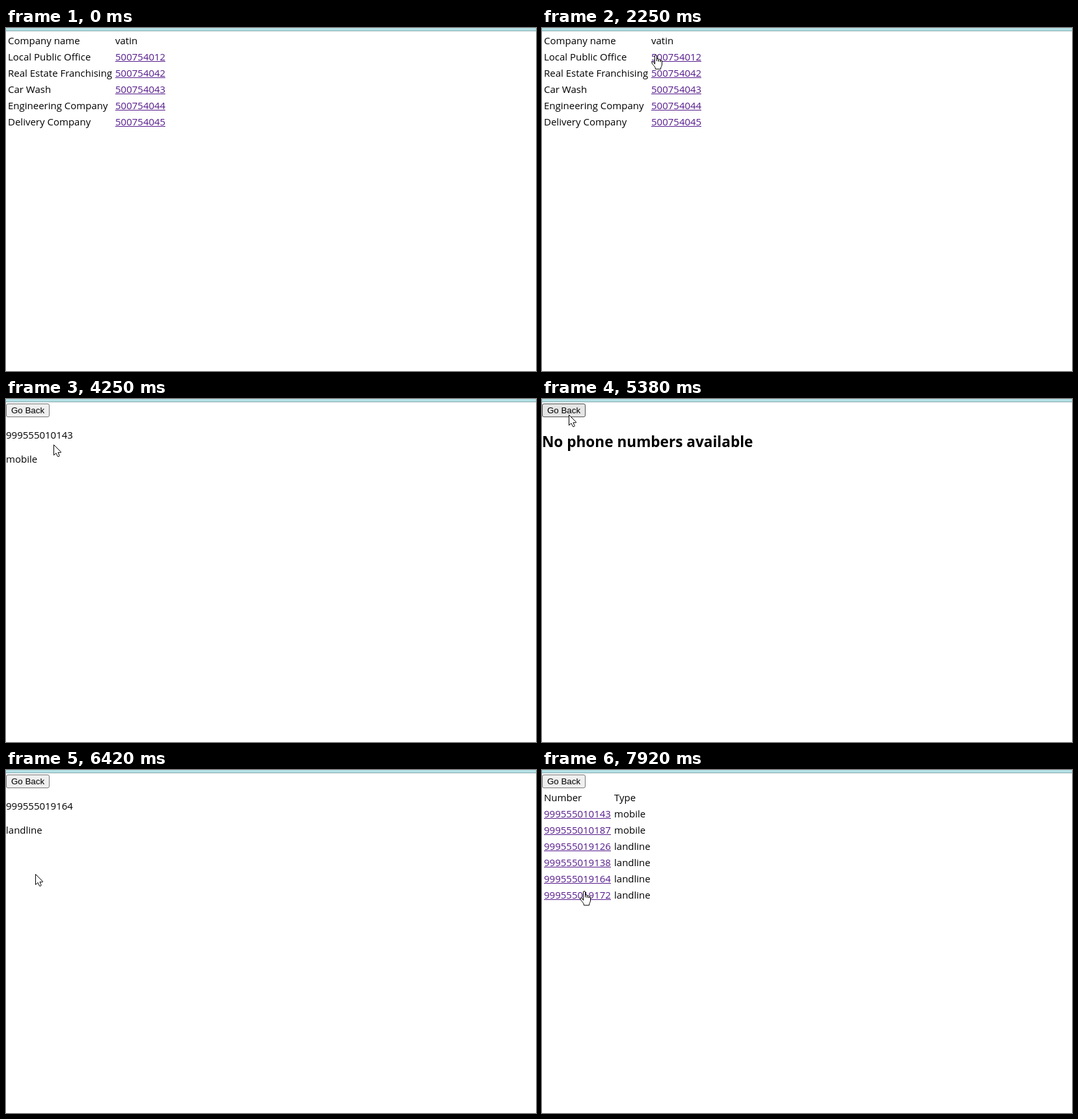
An HTML page with a canvas for the animation above (8000 ms loop, 815x528 px).

```html
<!DOCTYPE html>
<html lang="en">
<head>
<meta charset="utf-8">
<title>Company phone directory</title>
<style>
  html, body { margin: 0; width: 100%; height: 100%; overflow: hidden; background: #fff; }
  canvas { display: block; }
</style>
</head>
<body>
<canvas id="stage" width="815" height="528"></canvas>
<script>
// An opaque canvas allows subpixel text smoothing.
const ctx = document.getElementById('stage').getContext('2d', { alpha: false });
const LOOP = 8000;
const BODY = '15px "Open Sans", "Noto Sans", sans-serif';
const HEADING = 'bold 22.6px "Open Sans", "Noto Sans", sans-serif';
const BUTTON = '13.333px "Liberation Sans", Arial, sans-serif';
const VISITED = '#551a8b', UNVISITED = '#0000ee', ACTIVE = '#ff0000';

const companies = [
  ['Local Public Office', '500754012'],
  ['Real Estate Franchising', '500754042'],
  ['Car Wash', '500754043'],
  ['Engineering Company', '500754044'],
  ['Delivery Company', '500754045']
];
const phones = [
  ['999555010143', 'mobile'],
  ['999555010187', 'mobile'],
  ['999555019126', 'landline'],
  ['999555019138', 'landline'],
  ['999555019164', 'landline'],
  ['999555019172', 'landline']
];

// Each view holds from its start time until the next one.
const views = [
  { at: 0, name: 'companies' },
  { at: 3050, name: 'empty' },
  { at: 3110, name: 'phones' },
  { at: 4180, name: 'phones', active: 0 },
  { at: 4250, name: 'detail', item: 0 },
  { at: 5310, name: 'detail', item: 0, pressed: true },
  { at: 5380, name: 'empty' },
  { at: 5450, name: 'phones' },
  { at: 6280, name: 'phones', active: 4 },
  { at: 6350, name: 'detail', item: 4 },
  { at: 7300, name: 'detail', item: 4, pressed: true },
  { at: 7370, name: 'phones' }
];
const FRESH_LINK = 4, FRESH_UNTIL = 6350;

// Pointer moves: first step, last step, step count, destination x, y.
const moves = [
  [530, 530, 1, 605, 506],
  [600, 1110, 8, 125, 81],
  [1180, 1310, 3, 154, 52],
  [1380, 1510, 3, 165, 39],
  [1710, 1910, 3, 173, 41],
  [2250, 2250, 1, 174, 41],
  [3510, 3510, 1, 154, 56],
  [3580, 3650, 2, 73, 79],
  [3850, 3920, 2, 73, 70],
  [4380, 4450, 2, 71, 82],
  [4710, 4770, 2, 50, 35],
  [4980, 5040, 2, 41, 24],
  [5520, 5810, 5, 47, 142],
  [5950, 6010, 2, 45, 160],
  [6760, 7030, 5, 43, 6],
  [7090, 7160, 2, 42, 13],
  [7570, 7920, 6, 64, 186]
];

const arrow = new Path2D('M.5 .5V16.5L4 13.3L6.5 18.5H8.5L9.2 17.3L7 12.3H11.5V11.5Z');
const hand = new Path2D('M5.5 14.5V2a1.5 1.5 0 0 1 3 0V10V7.5a1.4 1.4 0 0 1 2.8 0V10.5V8.5' +
  'a1.4 1.4 0 0 1 2.8 0V11V10a1.2 1.2 0 0 1 2.4 0V15C16.5 18 14.5 18.5 14.5 22.2H6.5' +
  'C6.5 18.5 3 16.5 1 13C.2 11.4 2 10.2 3.4 11.4Z');

function pointerAt(t) {
  let pos = null;
  for (const [start, end, count, x, y] of moves) {
    if (t < start) break;
    const raw = end > start ? (t - start) / (end - start) * (count - 1) : 0;
    const p = Math.min(count, Math.floor(raw + 1e-6) + 1) / count;
    const ease = p * p * (3 - 2 * p);
    const from = pos || { x, y };
    pos = {
      x: Math.round(from.x + (x - from.x) * ease),
      y: Math.round(from.y + (y - from.y) * ease)
    };
  }
  return pos;
}

function text(str, x, baseline, font = BODY, color = '#000') {
  ctx.font = font;
  ctx.fillStyle = color;
  ctx.fillText(str, x, baseline);
}

function link(str, x, baseline, color) {
  text(str, x, baseline, BODY, color);
  ctx.fillRect(x, baseline + 1, Math.round(ctx.measureText(str).width), 1);
}

function drawButton(hovered, pressed) {
  ctx.beginPath();
  ctx.roundRect(0.5, 7.5, 66, 20, 2.5);
  ctx.fillStyle = pressed ? '#f5f5f5' : hovered ? '#e5e5e5' : '#efefef';
  ctx.strokeStyle = pressed ? '#8d8d8d' : hovered ? '#4f4f4f' : '#767676';
  ctx.lineWidth = 1;
  ctx.fill();
  ctx.stroke();
  text('Go Back', 8, 22, BUTTON);
}

function drawCompanies() {
  text('Company name', 3, 25);
  text('vatin', 168, 25);
  companies.forEach(([name, vatin], i) => {
    text(name, 3, 50 + 25 * i);
    link(vatin, 168, 50 + 25 * i, VISITED);
  });
}

function drawPhones(t, active) {
  text('Number', 3, 48);
  text('Type', 111, 48);
  phones.forEach(([number, type], i) => {
    const fresh = i === FRESH_LINK && t < FRESH_UNTIL;
    const color = i === active ? ACTIVE : fresh ? UNVISITED : VISITED;
    link(number, 3, 73 + 25 * i, color);
    text(type, 111, 73 + 25 * i);
  });
}

function overLink(view, { x, y }) {
  const inRows = (left, right, firstY, count) => {
    const row = Math.round((y - firstY) / 25);
    return x >= left && x <= right && row >= 0 && row < count &&
      Math.abs(y - firstY - 25 * row) <= 10;
  };
  if (view.name === 'companies') return inRows(168, 245, 45, companies.length);
  return view.name === 'phones' && inRows(3, 107, 68, phones.length);
}

function drawPointer(view, pos) {
  const isHand = overLink(view, pos);
  const shape = isHand ? hand : arrow;
  ctx.save();
  ctx.translate(pos.x - (isHand ? 6 : 0), pos.y);
  ctx.fillStyle = '#fff';
  ctx.strokeStyle = '#000';
  ctx.lineWidth = 1;
  ctx.fill(shape);
  ctx.stroke(shape);
  ctx.restore();
}

function draw(t) {
  const view = views.findLast(v => v.at <= t);
  const pos = pointerAt(t);
  ctx.fillStyle = '#fff';
  ctx.fillRect(0, 0, 815, 528);
  ctx.fillStyle = '#b4e0e5';
  ctx.fillRect(0, 0, 815, 4);
  ctx.fillStyle = '#87a9ad';
  ctx.fillRect(0, 4, 815, 1);

  if (view.name === 'companies') {
    drawCompanies();
  } else {
    const hovered = pos.x < 67 && pos.y >= 7 && pos.y < 28;
    drawButton(hovered, view.pressed);
    if (view.name === 'empty') text('No phone numbers available', 0, 74, HEADING);
    if (view.name === 'phones') drawPhones(t, view.active);
    if (view.name === 'detail') {
      const [number, type] = phones[view.item];
      text(number, 0, 61);
      text(type, 0, 98);
    }
  }
  if (pos) drawPointer(view, pos);
}

const began = performance.now();
function tick() {
  draw((performance.now() - began) % LOOP);
  requestAnimationFrame(tick);
}
tick();
</script>
</body>
</html>
```
